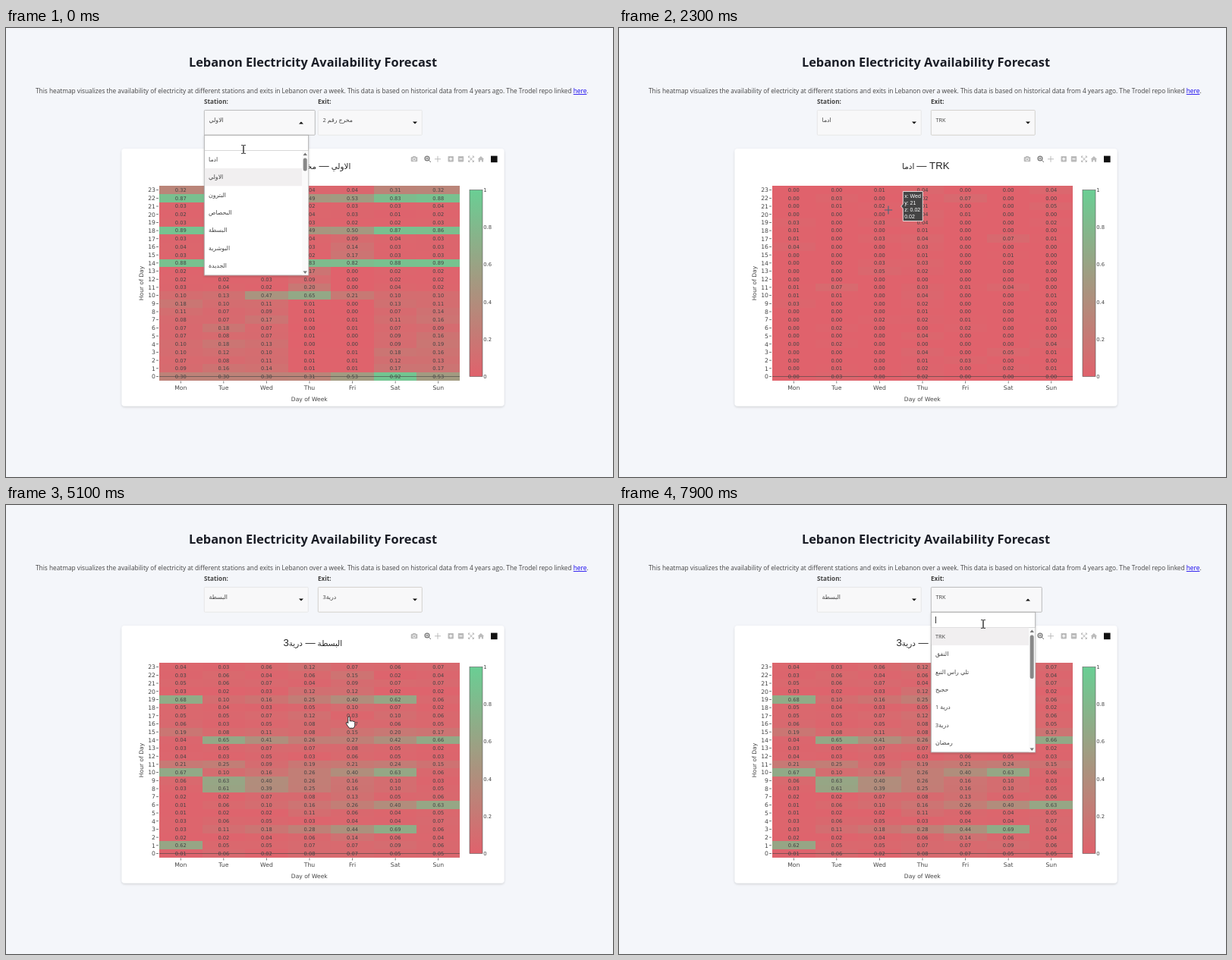
These frames come from a looping animation (800x592 px, 8 s). An HTML page:

```html
<!DOCTYPE html>
<html lang="en">
<head>
<meta charset="utf-8">
<title>Electricity forecast</title>
<style>
html, body { margin: 0; height: 100%; overflow: hidden; background: #f4f6fa; }
svg { display: block; width: 100vw; height: 100vh; }
text { font-family: "Open Sans", "DejaVu Sans", sans-serif; fill: #444; white-space: pre; }
.plot { font-family: "DejaVu Sans", sans-serif; }
.arial { font-family: "Liberation Sans", "DejaVu Sans", sans-serif; }
.mid { text-anchor: middle; }
.end { text-anchor: end; }
.crisp { shape-rendering: crispEdges; }
</style>
</head>
<body>
<svg viewBox="0 0 800 592">
  <defs>
    <linearGradient id="scale" x1="0" y1="1" x2="0" y2="0">
      <stop offset="0" stop-color="rgb(224,98,108)"/>
      <stop offset="1" stop-color="rgb(106,206,148)"/>
    </linearGradient>
    <filter id="shadow" x="-5%" y="-5%" width="110%" height="112%">
      <feDropShadow dx="0" dy="1.3" stdDeviation="1.6" flood-opacity=".16"/>
    </filter>
  </defs>
  <g id="page"></g>
  <g id="chart"></g>
  <g id="overlay"></g>
</svg>
<script>
const LOOP = 8000, GLIDE = 450;
const LEFT = 202, TOP = 208.3, CELL_W = 56.57, CELL_H = 10.69;
const DAYS = ['Mon', 'Tue', 'Wed', 'Thu', 'Fri', 'Sat', 'Sun'];
const $ = id => document.getElementById(id);
const range = n => [...Array(n).keys()];
const clamp = v => Math.max(0, Math.min(1, v));

// ---- drawing helpers
const rect = (x, y, w, h, fill, more = '') =>
  `<rect x="${x}" y="${y}" width="${w}" height="${h}" fill="${fill}" ${more}/>`;
const path = (d, more) => `<path d="${d}" ${more}/>`;
const text = (x, y, size, str, cls = '', more = '') =>
  `<text x="${x}" y="${y}" font-size="${size}" class="${cls}" ${more}>${str}</text>`;
const arabic = (str, size) => str.replace(/[\u0600-\u06ff][\u0600-\u06ff ]*/g,
  s => `<tspan font-size="${size}">${s}</tspan>`);

// ---- data: availability from 0 to 1 by hour and day
const noise = (h, d) => {
  const v = Math.sin(d * 12.9898 + h * 78.233) * 43758.5;
  return v - Math.floor(v);
};
const bell = (x, width = 1) => Math.exp(-((x / width) ** 2));

// Power comes every four hours from 14 to 22, less on Thursday and Friday.
function firstChart(h, d) {
  const dip = bell(d - 3.5, 0.8);
  const vary = 0.5 + noise(h, d);
  if (h === 23) return 0.32 * (1 - 1.3 * dip);
  if (h >= 14 && h % 4 === 2) return 0.85 + 0.06 * noise(h, d) - (h > 14 ? 0.56 : 0.1) * dip;
  if (h === 10) return 0.1 + 0.6 * bell(d - 2.7);
  if (h === 0) return 0.3 + 0.62 * bell(d - 5);
  if (h < 10) return 0.13 * vary * (1 - 1.4 * dip);
  if (d === 3 && h < 14 || d === 4 && h < 18) return (h < 14) === (d === 3) ? 0.17 * vary : 0;
  return 0.025 * vary;
}

// Hardly any power: a trickle on Thursday and rare blips elsewhere.
function secondChart(h, d) {
  if (d === 2 && h === 21) return 0.02;
  return d === 3 ? 0.045 * noise(h, d) : 0.07 * noise(h, d) ** 8;
}

// Main supply hours of each day fade towards the middle of the week.
const supply = [[1, 10, 19], [8, 9, 14], [], [], [], [3, 10, 19], [6, 14]];
function thirdChart(h, d) {
  const fades = supply.map((hours, day) => {
    const away = day < 3 ? d - day : day - d;
    if (!hours.includes(h) || away < 0 || away > 4 || day === 0 && away) return 0;
    return (0.61 + 0.08 * noise(h, day)) * Math.exp(-0.45 * away);
  });
  const base = h === 11 || h === 15 ? 0.17 : 0.045 + 0.06 * bell(d - 3.8, 1.2);
  return Math.max(base * (0.3 + 1.2 * noise(h, d)), ...fades);
}

const makeChart = (title, rule) => ({
  title,
  data: range(24).map(h => range(7).map(d => clamp(rule(h, d))))
});
const charts = {
  first: makeChart('الاولي — مخرج رقم 2', firstChart),
  second: makeChart('ادما — TRK', secondChart),
  third: makeChart('البسطة — درية3', thirdChart)
};

// ---- page and chart
const colour = v => `rgb(${[[224, 106], [98, 206], [108, 148]]
  .map(([a, b]) => Math.round(a + (b - a) * v))})`;
const rowY = hour => TOP + (23.5 - hour) * CELL_H;
const dayX = day => LEFT + (day + 0.5) * CELL_W;

function modebar() {
  const box = (x, sign) => rect(x - 3.7, 169, 7.4, 7.4, '#bbb', 'rx=".8"') +
    path(`M${x - 2} 172.7h4${sign}`, 'stroke="#fff" stroke-width="1.2"');
  const line = (d, c = '#bbb') => path(d, `fill="none" stroke="${c}"`);
  return rect(533.7, 170, 8.6, 6.2, '#bbb', 'rx="1"') + rect(536, 169, 4, 2, '#bbb') +
    '<circle cx="538" cy="173.2" r="1.8" fill="#bbb" stroke="#fff" stroke-width=".8"/>' +
    '<circle cx="555" cy="172" r="2.9" fill="none" stroke="#777" stroke-width="1.3"/>' +
    line('M557 174l3 3M553.4 172h3.2M555 170.4v3.2', '#777') +
    line('M565 172.8h8M569 168.8v8') +
    box(586.2, 'm-2-2v4') + box(599.5, '') +
    line('M609.5 171v-2h2M614.5 169h2v2M616.5 174.5v2h-2M611.5 176.5h-2v-2M610 169.5l6 6.5M616 169.5l-6 6.5') +
    path('M621.7 173l4.2-4 4.2 4h-1v3.5h-2.2v-2.3h-2v2.3h-2.2v-3.5z', 'fill="#bbb"') +
    rect(639, 168.6, 8.6, 8.6, '#111');
}

function drawPage() {
  const hours = range(24).map(h =>
    text(197, rowY(h) + 2.8, 7.7, h, 'plot end') +
    rect(198, rowY(h) - 0.35, 3, 0.7, '#444')).join('');
  const days = DAYS.map((name, d) =>
    text(dayX(d), 477.3, 7.7, name, 'plot mid') +
    rect(dayX(d) - 0.35, 465.5, 0.7, 3, '#444')).join('');
  const ticks = range(6).map(i =>
    text(629.3, 461.9 - i * 49.2, 6.8, i / 5, 'plot')).join('');
  $('page').innerHTML =
    text(404.5, 51, 16.4, 'Lebanon Electricity Availability Forecast', 'mid',
      'font-weight="700" style="fill:#1a1d26"') +
    text(39, 86, 8.3, 'This heatmap visualizes the availability of electricity at different ' +
      'stations and exits in Lebanon over a week. This data is based on historical data from ' +
      '4 years ago. The Trodel repo linked ' +
      '<tspan fill="#10e" text-decoration="underline">here</tspan>.') +
    text(261, 100, 8.2, 'Station:', '', 'font-weight="700"') +
    text(411, 100, 8.2, 'Exit:', '', 'font-weight="700"') +
    rect(152.5, 159, 504, 339.5, '#fff', 'rx="4" filter="url(#shadow)"') +
    modebar() + hours + days + ticks +
    rect(611, 213.6, 17, 245.9, 'url(#scale)', 'stroke="#555" stroke-width=".6"') +
    text(399.8, 492, 7.6, 'Day of Week', 'plot mid') +
    text(0, 0, 7.6, 'Hour of Day', 'plot mid', 'transform="translate(181 336.5) rotate(-90)"');
}

function drawChart({ title, data }) {
  let cells = '', labels = '';
  data.forEach((row, h) => row.forEach((v, d) => {
    cells += rect(LEFT + d * CELL_W, rowY(h) - CELL_H / 2, CELL_W, CELL_H, colour(v));
    labels += text(dayX(d), rowY(h) + 2.4, 6.7, v.toFixed(2), 'plot mid');
  }));
  $('chart').innerHTML =
    text(404.3, 186, 13.2, arabic(title, 10.4), 'arial mid', 'style="fill:#222"') +
    `<g class="crisp">${cells}</g>` +
    rect(LEFT, rowY(0) - 0.3, 7 * CELL_W, 0.6, '#444') + labels;
}

// ---- menus
const stations = ['ادما', 'الاولي', 'البترون', 'البحصاص', 'البسطة', 'البوشرية', 'الجديدة'];
const exitsA = ['TRK', 'ابي خليل', 'ادما', 'اكوا', 'جونية 2', 'خويري', 'دغفل'];
const exitsB = ['TRK', 'النفق', 'تلي راس النبع', 'حجيج', 'درية 1', 'درية3', 'رمضان'];
const MENU_X = { station: 261, exit: 411 };
const MENU_TOP = 141.3, ITEM_TOP = 161.7, ITEM_H = 23.3;

function drawSelect(kind, { menu, focus, [kind]: value }) {
  const x = MENU_X[kind], open = menu === kind;
  const tip = open ? 'M-3 1.5h6l-3-3z' : 'M-3-1.5h6l-3 3z';
  const edge = open ? '#b4b4b4' : focus === kind ? '#d0ccc8' : '#e6e6e6';
  return rect(x + 0.3, 108.4, open ? 146 : 137, 32.8, '#f8f8f9',
      `stroke="${edge}" stroke-width=".9" rx="1"`) +
    text(x + 6.5, 123.5, 7.3, arabic(value, 7.8)) +
    path(tip, `fill="#111" transform="translate(${x + 128} 125)"`);
}

function drawMenu(x, items, active, thumb, caret) {
  const rows = items.map((item, i) =>
    text(x + 6, ITEM_TOP + (i + 0.5) * ITEM_H + 2.8, 7.3, arabic(item, 7.8))).join('');
  return rect(x + 0.3, MENU_TOP, 137.4, 184.7, '#fff',
      'stroke="#aaa" stroke-width=".9" filter="url(#shadow)"') +
    rect(x + 0.8, 161, 136.5, 0.7, '#c8c8c8') +
    rect(x + 0.8, ITEM_TOP + active * ITEM_H, 128.5, ITEM_H, '#f1eff0') +
    rect(x + 129.3, 162, 8, 163.5, '#fafafa') +
    path(`M${x + 130.5} 168h5.5l-2.75-3.5zM${x + 130.5} 320.5h5.5l-2.75 3.5z`, 'fill="#777"') +
    rect(x + 130.7, 171.5, 5, thumb, '#888', 'rx="2.5"') +
    (caret ? rect(x + 6, 147, 0.9, 9, '#222') : '') + rows;
}

// ---- timeline: each step changes part of the state
const steps = [
  { t: -500, station: 'الاولي', exit: 'مخرج رقم 2', chart: 'first', menu: 'station', focus: 'station' },
  { t: 450, station: 'ادما', menu: '' },
  { t: 1000, menu: 'exit', focus: 'exit', items: exitsA },
  { t: 1700, exit: 'TRK', menu: '' },
  { t: 1900, chart: 'second' },
  { t: 3150, menu: 'station', focus: 'station' },
  { t: 3700, station: 'البسطة', menu: '' },
  { t: 4200, menu: 'exit', focus: 'exit', items: exitsB },
  { t: 4900, exit: 'درية3', menu: '' },
  { t: 5000, chart: 'third' },
  { t: 6350, menu: 'exit' },
  { t: 6950, exit: 'TRK', menu: '' },
  { t: 7450, menu: 'exit' }
];

// arrival time, x, y
const stops = [
  [0, 313, 160], [450, 316, 174], [900, 478, 124], [1450, 462, 180], [2250, 355, 240],
  [3050, 342, 126], [3580, 338, 256], [4150, 470, 124], [4650, 452, 279],
  [6300, 482, 124], [6780, 485, 179], [7400, 480, 124], [7820, 480, 157]
];

function pointerAt(t) {
  let [, x, y] = stops[0];
  for (const [arrival, nextX, nextY] of stops.slice(1)) {
    const p = clamp((t - arrival) / GLIDE + 1), k = p * p * (3 - 2 * p);
    x += (nextX - x) * k;
    y += (nextY - y) * k;
  }
  return { x, y };
}

function pointerShape({ x, y }, state, t) {
  const within = left => x > left && x < left + 138;
  if (state.menu && within(MENU_X[state.menu]) && y > MENU_TOP)
    return y < ITEM_TOP ? 'beam' : 'hand';
  if (!state.menu && t - state.t < 350) return 'hand';
  if (y > 108 && y < MENU_TOP && Object.values(MENU_X).some(within)) return 'hand';
  return y > TOP ? 'cross' : 'arrow';
}

const pointerPaths = {
  beam: ['M-2.5-4.5h2q.5 0 .5.8v7.4q0 .8-.5.8h-2M2.5-4.5h-2q-.5 0-.5.8v7.4q0 .8.5.8h2',
    'fill="none" stroke="#333" stroke-width=".8"'],
  cross: ['M-4.3 0h8.6M0-4.6v9.2', 'stroke="#41677a" stroke-width=".9"'],
  arrow: ['M0 0v10l2.4-2.2 1.6 3.6 1.5-.7-1.6-3.5h3.2z',
    'fill="#fff" stroke="#222" stroke-width=".8"'],
  hand: ['M-1 1q0-1 1-1t1 1v4q.6-.7 1.8 0 1-.6 1.9.3 1.7-.4 1.8 1v3.2q-.2 2-1.5 3.2h-4.5q-2-2.2-3.5-5-.3-1.7 1.3-1.2l.7.8z',
    'fill="#fff" stroke="#222" stroke-width=".8"']
};

function drawTooltip(data, { x, y }) {
  const day = Math.floor((x - LEFT) / CELL_W);
  const hour = 23 - Math.floor((y - 2 - TOP) / CELL_H);
  if (!data[hour] || !DAYS[day]) return '';
  const z = data[hour][day].toFixed(2);
  const px = LEFT + (day + 1) * CELL_W, py = rowY(hour);
  const lines = [`x: ${DAYS[day]}`, `y: ${hour}`, `z: ${z}`, z];
  return path(`M${px} ${py}l2.6-3v-16.5h26v39h-26v-16.5z`,
      'fill="#444" stroke="#fff" stroke-width=".8"') +
    lines.map((s, i) =>
      text(px + 4.5, py - 11.5 + i * 9.3, 7, s, 'arial', 'style="fill:#fff"')).join('');
}

let shown;
function render(t) {
  const state = Object.assign({}, ...steps.filter(s => s.t <= t));
  const chart = charts[state.chart];
  if (chart !== shown) drawChart(shown = chart);

  const mouse = pointerAt(t), shape = pointerShape(mouse, state, t);
  let out = drawSelect('station', state) + drawSelect('exit', state);
  if (state.menu) {
    const isStation = state.menu === 'station';
    const items = isStation ? stations : state.items;
    const hover = Math.floor((mouse.y - ITEM_TOP) / ITEM_H);
    const active = shape === 'hand' && hover >= 0
      ? hover : Math.max(0, items.indexOf(state[state.menu]));
    out += drawMenu(MENU_X[state.menu], items, active, isStation ? 17 : 57.5,
      (t - state.t) % 1000 < 500);
  } else if (shape === 'cross') {
    out += drawTooltip(chart.data, mouse);
  }
  const [d, style] = pointerPaths[shape];
  $('overlay').innerHTML = out +
    path(d, `${style} transform="translate(${mouse.x} ${mouse.y}) scale(1.2)"`);
}

drawPage();
const start = performance.now();
function frame() {
  render((performance.now() - start) % LOOP);
  requestAnimationFrame(frame);
}
frame();
</script>
</body>
</html>
```
